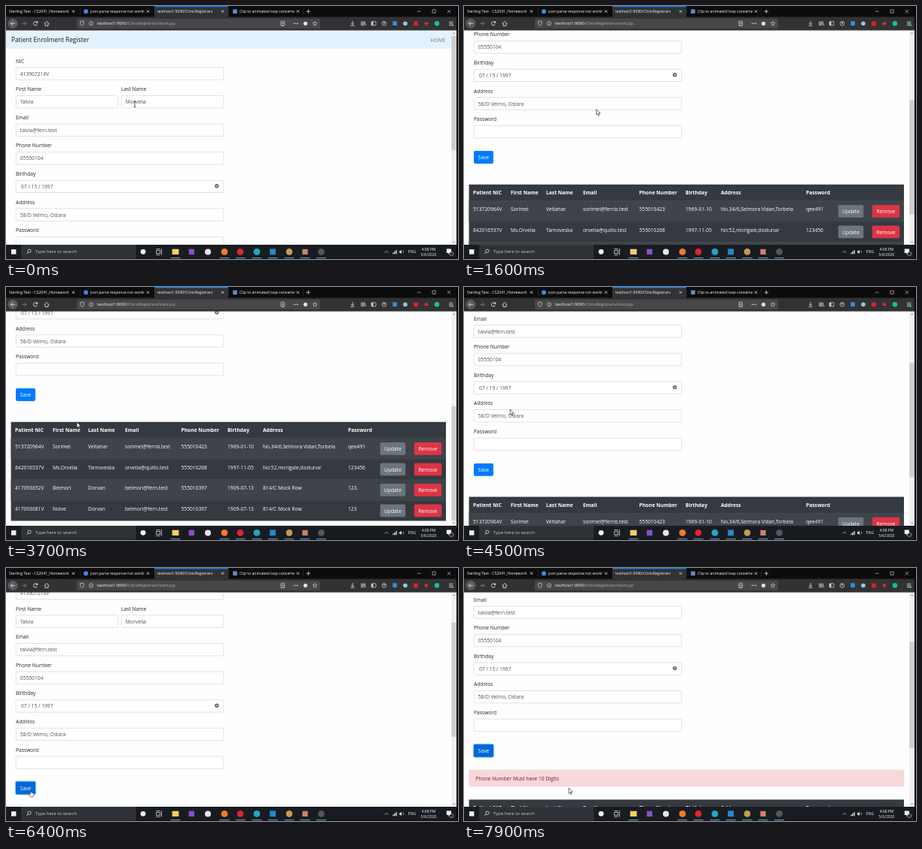
Animation of 600 by 337 pixels, one loop 8000 ms. Source, as an HTML page with a canvas:

```html
<!DOCTYPE html>
<html lang="en">
<head>
<meta charset="utf-8">
<title>Patient form</title>
<style>
  html, body { margin: 0; width: 100%; height: 100%; overflow: hidden; background: #000; }
  canvas { display: block; width: 600px; height: 337px; }
</style>
</head>
<body>
<canvas id="stage"></canvas>
<script>
const canvas = document.getElementById('stage');
const ratio = window.devicePixelRatio || 1;
canvas.width = 600 * ratio;
canvas.height = 337 * ratio;
const c = canvas.getContext('2d');

const LOOP = 8000, STEP = 100;
const ALERT_AT = 6800, HOVER_AT = 6200, FOCUS_AT = 6400;
const TEXT = 6.7;

// Wheel notches: start time, scroll position reached
const NOTCHES = [[0, 0], [400, 50], [800, 100], [1400, 150], [1700, 200], [2000, 206],
  [3900, 156], [4150, 106.2], [4800, 56.5], [7000, 106.2]];
// Pointer: time, x, y, shape
const POINTER = [[0, 171, 131, 'beam'], [400, 171, 131, 'arrow'], [700, 170.5, 127, 'arrow'],
  [1500, 170.5, 127, 'arrow'], [2100, 241, 270, 'beam'], [2700, 241, 270, 'arrow'],
  [3500, 94, 180, 'arrow'], [3800, 94, 180, 'arrow'], [4400, 61, 163, 'arrow'],
  [5300, 61, 163, 'arrow'], [6200, 33, 296, 'hand'], [7100, 33, 296, 'arrow'],
  [7900, 139, 293, 'arrow']];

const COLUMNS = [12, 62, 109, 158, 232.5, 294, 341, 454];
const HEADINGS = ['Patient NIC', 'First Name', 'Last Name', 'Email', 'Phone Number', 'Birthday', 'Address', 'Password'];
const ROWS = [
  ['513720964V', 'Sorimel', 'Veltahar', 'sorimel@fernb.test', '555010423', '1969-01-10', 'No.34/6,Selmora Vidan,Torbela', 'qee491'],
  ['842016537V', 'Ms.Orvelia', 'Tarnoveska', 'orvelia@quillo.test', '555010268', '1997-11-05', 'No:52,morigale,dostunar', '123456'],
  ['417093652V', 'Belmori', 'Dorvan', 'belmori@fern.test', '555010397', '1909-07-13', '814/C Mock Row', '123.'],
  ['417093681V', 'Nolve', 'Dorvan', 'belmori@fern.test', '555010397', '1909-07-13', '814/C Mock Row', '123']
];

function rect(x, y, w, h, fill, radius = 0, stroke, width = 0.5) {
  c.beginPath();
  c.roundRect(x, y, w, h, radius);
  if (fill) { c.fillStyle = fill; c.fill(); }
  if (stroke) { c.strokeStyle = stroke; c.lineWidth = width; c.stroke(); }
}

function disc(x, y, r, fill, stroke, width = 0.8) {
  rect(x - r, y - r, 2 * r, 2 * r, fill, r, stroke, width);
}

function path(points, stroke, width = 0.8, fill) {
  c.beginPath();
  for (let i = 0; i < points.length; i += 2) c.lineTo(points[i], points[i + 1]);
  if (fill) { c.closePath(); c.fillStyle = fill; c.fill(); }
  if (stroke) { c.strokeStyle = stroke; c.lineWidth = width; c.stroke(); }
}

function cross(x, y, r, color, width) {
  path([x - r, y - r, x + r, y + r], color, width);
  path([x + r, y - r, x - r, y + r], color, width);
}

// y is the middle of the capitals
function text(str, x, y, color = '#212529', size = TEXT, weight = 400, align = 'left') {
  c.font = `${weight} ${size}px "Open Sans", "Noto Sans", sans-serif`;
  c.textAlign = align;
  c.fillStyle = color;
  c.fillText(str, x, y + size * 0.357);
}

function clipped(x, y, w, h, draw) {
  c.save();
  c.beginPath();
  c.rect(x, y, w, h);
  c.clip();
  draw();
  c.restore();
}

function scrollAt(t) {
  let pos = 0;
  for (const [start, goal] of NOTCHES) {
    if (t < start) break;
    const p = Math.min(1, (t - start) / 250);
    pos += (goal - pos) * (1 - (1 - p) ** 2);
  }
  return pos;
}

function pointerAt(t) {
  const i = Math.max(1, POINTER.findIndex(k => k[0] >= t));
  const a = POINTER[i - 1], b = POINTER[i];
  const p = (t - a[0]) / (b[0] - a[0]), e = p * p * (3 - 2 * p);
  return { x: a[1] + (b[1] - a[1]) * e, y: a[2] + (b[2] - a[2]) * e, shape: p >= 1 ? b[3] : a[3] };
}

function field(label, value, y, x = 13, w = 276) {
  text(label, x, y);
  rect(x + 0.2, y + 8.6, w - 0.4, 16.4, '#fff', 1.8, '#c8ced4', 0.6);
  text(value, x + 5.8, y + 17, '#495057');
}

function button(label, x, y, w, color) {
  rect(x, y, w, 16.8, color, 1.8);
  text(label, x + w / 2, y + 8.8, '#fff', TEXT, 400, 'center');
}

function table(top) {
  const rowHeight = 27.55;
  rect(6.6, top, 577.4, 21.5 + 4 * rowHeight, '#343a40');
  HEADINGS.forEach((h, i) => text(h, COLUMNS[i], top + 11.3, '#fff', TEXT, 700));
  ROWS.forEach((row, r) => {
    const y = top + 21.5 + r * rowHeight;
    if (r % 2 === 0) rect(6.6, y, 577.4, rowHeight, '#3e444a');
    rect(6.6, y, 577.4, 0.5, '#454d55');
    row.forEach((value, i) => text(value, COLUMNS[i], y + 11.3, '#fff'));
    button('Update', 496.7, y + 5.6, 33.6, '#6c757d');
    button('Remove', 541.8, y + 5.6, 36.4, '#dc3545');
  });
}

function page(t, scroll) {
  const alert = t >= ALERT_AT;
  rect(0, 32, 598, 286, '#fefefe');
  c.save();
  c.translate(0, -scroll);
  rect(0, 32, 591, 25, '#e3f2fd');
  text('Patient Enrolment Register', 7, 45.5, '#17191b', 8.3);
  text('HOME', 563.5, 45.3, '#74797e');
  field('NIC', '413907216V', 73.2);
  field('First Name', 'Talvia', 110.8, 13, 136);
  field('Last Name', 'Morvelia', 110.8, 153, 136);
  field('Email', 'talvia@fern.test', 148.4);
  field('Phone Number', '05550104', 186);
  field('Birthday', '', 223.6);
  text('07 / 15 / 1997', 20, 240.6, '#495057');
  disc(279.8, 239.8, 2.7, '#666');
  cross(279.8, 239.8, 1, '#fff', 0.7);
  field('Address', '58/D Velmo, Ostara', 261.2);
  field('Password', '', 298.8);
  if (t >= FOCUS_AT) rect(11.8, 339.9, 28.4, 19, '#93c7ff', 2.8);
  button('Save', 13, 341.1, 26, t >= HOVER_AT ? '#0069d9' : '#007bff');
  if (alert) {
    rect(6.8, 375.3, 577, 21.8, '#f8d7da', 1.8, '#f5c6cb');
    text('Phone Number Must have 10 Digits', 15.5, 387, '#721c24');
  }
  table(alert ? 414.7 : 385.8);
  c.restore();

  const thumb = alert ? 142 : 152, limit = alert ? 234.8 : 206;
  rect(591, 32, 7.2, 286, '#f0f0f0');
  rect(591.4, 40 + scroll / limit * (271 - thumb), 6.4, thumb, '#cdcdcd');
  path([593, 37.2, 594.6, 35.6, 596.2, 37.2], '#606060', 0.8);
  path([593, 313.6, 594.6, 315.2, 596.2, 313.6], '#606060', 0.8);
}

function tab(x, title, end, icon) {
  if (icon) icon();
  clipped(x, 0, end - x, 15, () => text(title, x, 7.3, '#f9f9fa', 5.1));
  cross(end + 4.5, 7.2, 1.6, '#f0f0f2', 0.8);
}

function browser() {
  const ink = '#e2e2e4';
  rect(0, 0, 598, 15, '#0c0c0d');
  rect(0, 14.5, 598, 18, '#323234');
  rect(197, 0, 98, 15, '#323234');
  rect(197, 0, 98, 1.2, '#0a84ff');
  for (const x of [98, 197, 295, 394]) rect(x, 3, 0.4, 9, '#444');
  tab(4, 'Sterling Text - CS2041_Homework', 85);
  tab(112, 'json parse response not workin', 184, () => disc(106, 7.2, 3, '#4285f4'));
  tab(201, 'testhost1:9090/ClinicRegistrars', 283);
  tab(310, 'Clip to animated loop converter', 383, () => rect(301.2, 4.4, 5.6, 5.6, '#5b8fd0'));
  path([398.6, 7.2, 404, 7.2], ink);
  path([401.3, 4.5, 401.3, 9.9], ink);
  path([546, 7.2, 550.5, 7.2], ink, 0.6);
  rect(566, 5, 4.2, 4.2, null, 0, ink, 0.6);
  cross(588, 7.2, 2.2, ink, 0.6);

  // Navigation
  disc(9, 23.3, 6, '#58585b', '#808083', 0.5);
  path([9, 20.6, 6.3, 23.3, 9, 26], ink, 0.9);
  path([6.3, 23.3, 12, 23.3], ink, 0.9);
  path([24.4, 20.8, 26.9, 23.3, 24.4, 25.8], '#8a8a8c');
  path([21.3, 23.3, 26.9, 23.3], '#8a8a8c');
  c.beginPath();
  c.arc(39, 23.3, 2.6, 0.4, 5.6);
  c.strokeStyle = ink;
  c.lineWidth = 0.9;
  c.stroke();
  path([42.2, 19.8, 42.2, 22.7, 39.3, 22.7], null, 0, ink);
  path([50.8, 23.6, 54, 20.4, 57.2, 23.6], ink, 0.9);
  path([52, 23, 52, 26.3, 56, 26.3, 56, 23], ink, 0.9);

  // Address bar
  rect(94, 16.8, 323, 13.2, '#474749', 1.4);
  path([98.6, 20.8, 101, 20, 103.4, 20.8, 103, 24.5, 101, 26.6, 99, 24.5, 98.6, 20.8], ink, 0.7);
  disc(113, 23.3, 2.6, null, ink, 0.6);
  rect(112.7, 22.8, 0.7, 2, ink);
  rect(112.7, 21.5, 0.7, 0.7, ink);
  text('testhost1:9090', 121, 23.4, '#f9f9fa', 5.6);
  text('/ClinicRegistrars/start.jsp', 121 + c.measureText('testhost1:9090').width, 23.4, '#b4b4b7', 5.6);
  rect(365, 20.3, 4.6, 6, null, 0.5, ink, 0.7);
  for (const y of [22, 23.5, 25]) rect(366, y, 2.6, 0.5, ink);
  for (const x of [382.6, 385, 387.4]) disc(x, 23.3, 0.8, ink);
  disc(397.5, 23.3, 2.6, ink);
  const star = [];
  for (let i = 0; i <= 10; i++) {
    const r = i % 2 ? 1.4 : 3, a = i * Math.PI / 5;
    star.push(410 + r * Math.sin(a), 23.4 - r * Math.cos(a));
  }
  path(star, ink, 0.6);

  // Toolbar buttons
  path([460, 20, 460, 24.6], ink);
  path([458, 22.8, 460, 24.8, 462, 22.8], ink);
  path([457.3, 26.2, 462.7, 26.2], ink);
  for (const x of [471.8, 473.4, 475]) path([x, 20.5, x, 26.2], ink);
  path([476, 20.6, 477.6, 26.2], ink);
  rect(485, 20.8, 6, 5, null, 0.6, ink, 0.7);
  rect(485.4, 21, 2, 4.6, ink);
  disc(502, 23.3, 2.8, null, ink, 0.7);
  disc(502, 22.6, 1, ink);
  rect(513.3, 20.3, 5.6, 5.6, '#2f8fe0', 0.6);
  disc(530, 23.3, 2.8, '#9fc9d6');
  rect(541.2, 20.4, 5.8, 5.8, '#e02020', 0.5);
  disc(558, 23.3, 2.4, '#c92f3c');
  disc(572, 23.3, 3.2, '#15c39a');
  for (const y of [21.2, 23.3, 25.4]) rect(588, y - 0.4, 5.4, 0.8, ink);
  disc(592.8, 25.5, 1.5, '#3fae4c');
}

function taskbar() {
  const ink = '#f2f2f2';
  rect(0, 318, 598, 18.4, '#181c21');
  rect(7, 324.2, 6.4, 6.4, ink);
  rect(20.8, 318.6, 151, 17.4, '#2e3135', 0, '#484b4f', 0.5);
  disc(31, 326.2, 2.2, null, ink, 0.7);
  path([29.4, 327.9, 27.4, 330], ink);
  text('Type here to search', 39, 327.3, '#cdcecf', 6);
  disc(182, 327.3, 3.4, ink);
  rect(199.5, 325.5, 4.8, 4, null, 0, ink, 0.7);
  rect(199.5, 323.2, 4.8, 0.7, ink);
  rect(199.5, 331, 4.8, 0.7, ink);
  path([206.3, 323.2, 206.3, 331.5], ink, 0.8);

  rect(220.6, 323.7, 8.8, 7.4, '#f7cf62', 0.6);
  rect(242.6, 323.7, 7.4, 7.4, '#8a4fc2');
  disc(268, 327.4, 4, '#e8e4ea');
  disc(290, 327.4, 4.4, '#f47a28');
  disc(311, 327.4, 4.3, '#e8202f');
  disc(333, 327.4, 4.4, '#22a6c4');
  rect(350.2, 323.4, 7.8, 7.8, '#2489ca');
  disc(376, 327.4, 4.3, '#c69a52');
  rect(393.4, 323.8, 7.2, 7.2, '#cf8068');
  disc(418.5, 327.4, 4.3, '#55565a');
  for (const x of [225, 290, 311.3, 333, 354.3, 376, 397, 418.5]) rect(x - 6.5, 335.2, 13, 0.9, '#76b9ed');

  path([503, 328.4, 505, 326.4, 507, 328.4], ink, 0.7);
  for (let i = 0; i < 4; i++) rect(513.3 + i * 1.5, 328.8 - i * 1.3, 1, 1.4 + i * 1.3, ink);
  path([522, 326.4, 523.3, 326.4, 525, 324.8, 525, 330, 523.3, 328.4, 522, 328.4], null, 0, ink);
  c.beginPath();
  c.arc(525, 327.4, 2.6, -0.8, 0.8);
  c.strokeStyle = ink;
  c.lineWidth = 0.6;
  c.stroke();
  text('ENG', 533.8, 327.4, ink, 5.1);
  text('4:08 PM', 561, 323.9, ink, 5, 400, 'center');
  text('5/6/2020', 561, 331.3, ink, 5, 400, 'center');
  path([584.8, 323.6, 591, 323.6, 591, 329, 588.8, 329, 587.4, 331, 587.4, 329, 584.8, 329], null, 0, ink);
  disc(591.3, 330, 2.6, '#23272c', ink, 0.5);
}

function pointer({ x, y, shape }) {
  c.save();
  c.translate(x, y);
  if (shape === 'beam') {
    path([0, -3.5, 0, 3.5], '#111', 0.7);
    path([-1.5, -3.6, 1.5, -3.6], '#111', 0.6);
    path([-1.5, 3.6, 1.5, 3.6], '#111', 0.6);
  } else if (shape === 'arrow') {
    path([0, 0, 0, 7.4, 1.7, 5.8, 2.9, 8.4, 4, 7.9, 2.9, 5.4, 5.2, 5.3, 0, 0], '#111', 0.6, '#fff');
  } else {
    path([-0.7, 0, 0.4, 0, 0.6, 3, 3.8, 3.8, 4.1, 6, 3, 8.7, -0.5, 8.7, -2.8, 5.2, -2.2, 4.4, -0.7, 5.4, -0.7, 0], '#111', 0.6, '#fff');
  }
  c.restore();
}

function frame(now) {
  const t = Math.floor(now % LOOP / STEP) * STEP;
  c.setTransform(ratio, 0, 0, ratio, 0, 0);
  rect(0, 0, 600, 337, '#000');
  clipped(0, 32, 598.2, 286, () => page(t, scrollAt(t)));
  browser();
  taskbar();
  pointer(pointerAt(t));
  requestAnimationFrame(frame);
}
requestAnimationFrame(frame);
</script>
</body>
</html>
```
